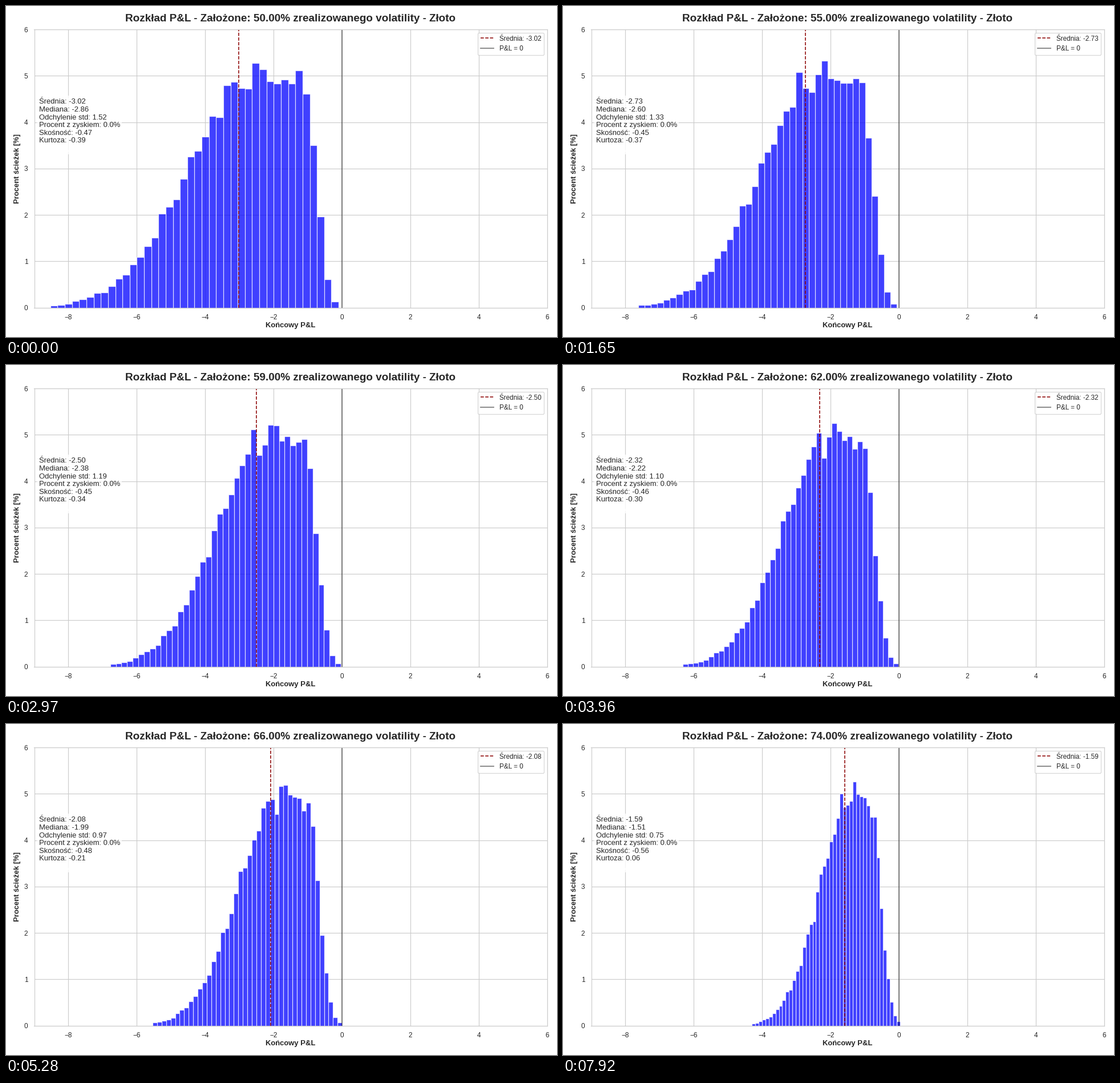
These frames come from a looping animation (966x580 px, 8000 ms). A matplotlib script:

```python
import numpy as np
import matplotlib.pyplot as plt
from matplotlib.animation import FuncAnimation
from matplotlib.patches import FancyBboxPatch, Rectangle

W, H, DPI = 966, 580, 64
STEP, HOLD, LOOP = 40, 330, 8000      # ms
LAST = LOOP // HOLD
LEFT, RIGHT, TOP, BOTTOM = 49.5, 949, 41, 528.7
BINS = 50
INK, PALE = "0.15", "0.8"

GRAIN = np.random.default_rng(4).normal(0, 0.07, BINS)


def pt(px):
    return px * 72 / DPI


plt.rcParams.update({
    "font.family": "Liberation Sans",
    "text.color": INK,
    "xtick.color": INK,
    "ytick.color": INK,
    "axes.labelcolor": INK,
})


def statistics(k):
    """Moments of the result when volatility is 50 % + k."""
    mean = -3.02 + 0.0569 * k + 0.00011 * k**2
    median = -2.86 + 0.0512 * k + 0.00021 * k**2
    std = 1.5205 - 0.03863 * k + 0.000267 * k**2
    skew = -0.448 - 0.00039 * (k - 7)**2
    kurt = -0.3855 + 0.4452 * (k / 24)**2.35
    return mean, median, std, skew, kurt


def histogram(k, mean, std):
    """Left edges, bin width and heights: Gaussian left flank, flat top, soft cliff."""
    width = 0.2106 - 0.0054 * k + 0.00003 * k**2
    right = -0.103 + 0.0085 * k - 0.00013 * k**2
    slots = np.arange(BINS)
    x = right - (slots + 1) * width
    z = (x + width / 2 - mean) / std

    flank = np.exp(-0.31 * np.minimum(z - 0.3, 0)**2)
    cliff = 1 / (1 + np.exp((z - 1.53 + 0.0025 * k) / (0.09 + 0.003 * k)))
    phase = 2 * np.pi * (z - 0.13)
    ripple = -0.065 * np.cos(phase / 0.53) * np.cos(phase / 2.65)
    h = 4.97 * flank * cliff
    h = h * (1 + ripple) + GRAIN * np.sqrt(h / 5)
    return x, width, np.where(z > -3.6, np.maximum(h, 0.01), 0)


fig = plt.figure(figsize=(W / DPI, H / DPI), dpi=DPI, facecolor="white")
ax = fig.add_axes([LEFT / W, 1 - BOTTOM / H, (RIGHT - LEFT) / W, (BOTTOM - TOP) / H])
ax.set(xlim=(-9, 6), ylim=(0, 6), xticks=range(-8, 7, 2), yticks=range(7))
ax.set_axisbelow(True)
ax.grid(color=PALE, lw=pt(1.18))
ax.tick_params(length=0, pad=pt(11.2), labelsize=pt(11.78))
for spine in ax.spines.values():
    spine.set(color=PALE, linewidth=pt(1.18))


def label(x, y, text="", size=12.95, **kw):
    return fig.text(x / W, 1 - y / H, text, fontsize=pt(size), **kw)


title = label(498.7, 27.3, size=18.84, weight="bold", ha="center", va="baseline")
label(499.2, 563.5, "Końcowy P&L", weight="bold", ha="center", va="baseline")
label(20, 285, "Procent ścieżek [%]", weight="bold", rotation=90,
      ha="center", va="center")

bars = [ax.add_patch(Rectangle((0, 0), 0, 0, facecolor="blue", edgecolor="white",
                               alpha=0.75, lw=pt(1.18)))
        for _ in range(BINS)]
mean_line = ax.axvline(0, color="darkred", ls="--", lw=pt(1.55))
zero_line = ax.axvline(0, color="black", alpha=0.5, lw=pt(1.77))

legend = ax.legend([mean_line, zero_line], ["Średnia: -3.02", "P&L = 0"],
                   loc="upper right", fontsize=pt(11.78))
legend.get_frame().set(edgecolor=PALE, linewidth=pt(1.18))
mean_entry = legend.get_texts()[0]

# Pale panel behind the statistics
fig.add_artist(FancyBboxPatch((58.3 / W, 1 - 256 / H), 141 / W, 95 / H,
                              boxstyle="square,pad=0", facecolor="white",
                              edgecolor="white", alpha=0.8, lw=pt(7.8),
                              joinstyle="round"))
stats = [label(58.3, 171.3 + 13.6 * i, va="baseline") for i in range(6)]


def update(i):
    k = min((i * STEP + STEP // 2) // HOLD, LAST)
    mean, median, std, skew, kurt = statistics(k)

    edges, width, heights = histogram(k, mean, std)
    for bar, x, h in zip(bars, edges, heights):
        bar.set_bounds(x, 0, width, h)
        bar.set_visible(h > 0)

    mean_line.set_xdata([mean, mean])
    mean_entry.set_text(f"Średnia: {mean:.2f}")
    title.set_text(f"Rozkład P&L - Założone: {50 + k:.2f}% "
                   "zrealizowanego volatility - Złoto")
    lines = (f"Średnia: {mean:.2f}", f"Mediana: {median:.2f}",
             f"Odchylenie std: {std:.2f}", "Procent z zyskiem: 0.0%",
             f"Skośność: {skew:.2f}", f"Kurtoza: {kurt:.2f}")
    for text, line in zip(stats, lines):
        text.set_text(line)
    return [*bars, mean_line, mean_entry, title, *stats]


anim = FuncAnimation(fig, update, frames=LOOP // STEP, interval=STEP,
                     repeat=True, repeat_delay=0, init_func=lambda: update(0))
plt.show()
```
